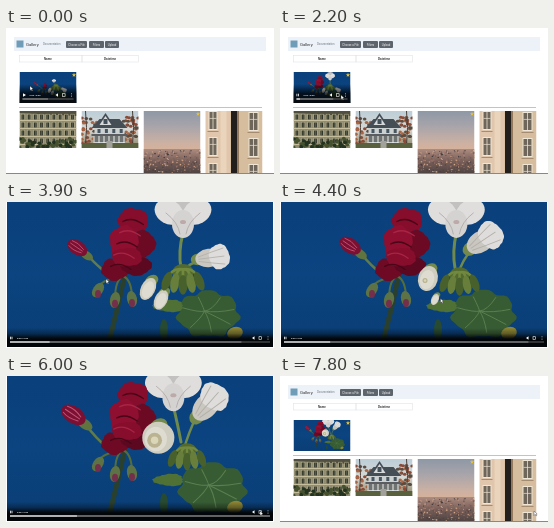
Write an HTML page with a canvas that moves like this. It is 268 px wide and 146 px high and loops after 7.9 s.

```html
<!DOCTYPE html>
<html lang="en">
<head>
<meta charset="utf-8">
<title>Gallery</title>
<style>
html, body { margin: 0; width: 100%; height: 100%; overflow: hidden; background: #fff; }
canvas { display: block; width: 268px; height: 146px; }
</style>
</head>
<body>
<canvas id="stage"></canvas>
<script>
const W = 268, H = 146, LOOP = 7900, OPEN = 2600, CLOSE = 6600, START = 850;
const canvas = document.getElementById('stage');
const c = canvas.getContext('2d');
const dpr = window.devicePixelRatio || 1;
canvas.width = W * dpr;
canvas.height = H * dpr;

const rect = (x, y, w, h, fill) => { c.fillStyle = fill; c.fillRect(x, y, w, h); };

function oval(x, y, rx, ry, turn, fill) {
  c.fillStyle = fill;
  c.beginPath();
  c.ellipse(x, y, rx, ry, turn, 0, 7);
  c.fill();
}

function poly(points, fill) {
  c.fillStyle = fill;
  c.beginPath();
  points.forEach(p => c.lineTo(...p));
  c.closePath();
  c.fill();
}

// Oval with a wavy edge
function ruffle(x, y, rx, ry, waves, depth, fill) {
  const edge = [];
  for (let a = 0; a < 6.28; a += .1) {
    const r = 1 + depth * (Math.sin(a * waves + x) + .4 * Math.sin(a * 13 + y));
    edge.push([x + rx * r * Math.cos(a), y + ry * r * Math.sin(a)]);
  }
  poly(edge, fill);
}

function curve(x, y, cx, cy, ex, ey, stroke, width) {
  c.strokeStyle = stroke;
  c.lineWidth = width;
  c.beginPath();
  c.moveTo(x, y);
  c.quadraticCurveTo(cx, cy, ex, ey);
  c.stroke();
}

function text(str, x, y, size, fill, weight = '') {
  c.font = `${weight} ${size}px "Liberation Sans", sans-serif`;
  c.fillStyle = fill;
  c.fillText(str, x, y);
}

function fade(y, h, ...colors) {
  const g = c.createLinearGradient(0, y, 0, y + h);
  colors.forEach((col, i) => g.addColorStop(i / (colors.length - 1), col));
  return g;
}

// Draw in local units, clipped to a box
function framed(x, y, w, h, scale, draw) {
  c.save();
  c.beginPath();
  c.rect(x, y, w, h);
  c.clip();
  c.translate(x, y);
  c.scale(scale, scale);
  draw();
  c.restore();
}

function placed([x, y, scale, turn = 0], draw) {
  c.save();
  c.translate(x, y);
  c.scale(scale, scale);
  c.rotate(turn);
  draw();
  c.restore();
}

function random(seed) {
  return () => (seed = (seed * 16807) % 2147483647) / 2147483647;
}

function ease(t, from, to) {
  const k = Math.min(1, Math.max(0, (t - from) / (to - from)));
  return k * k * (3 - 2 * k);
}

const mix = (a, b, k) => a.map((v, i) => v + (b[i] - v) * k);

function redFlower() {
  ruffle(-13, 21, 13, 11, 5, .05, '#6f0a25');
  ruffle(8, 17, 15, 10, 4, .05, '#5c0820');
  ruffle(5, -27, 15, 12, 5, .05, '#860d2c');
  ruffle(14, -4, 13, 13, 4, .05, '#6c0a24');
  ruffle(-4, -6, 14, 16, 5, .05, '#8f0f30');
  ruffle(-1, 9, 15, 9, 4, .05, '#860d2c');
  for (let i = 0; i < 5; i++) {
    const y = -26 + i * 11, x = 4 - i * 3;
    curve(x - 9, y, x, y - 5, x + 11, y + 3, i % 2 ? '#a92546' : '#480617', 1.3);
  }
}

function redBud() {
  oval(12, 1, 7, 4, 0, '#60743f');
  oval(0, 0, 11, 7, 0, '#7c1033');
  for (let i = -1; i < 2; i++) curve(-8, i * 3, -2, i * 5, 6, i * 2, '#bd5577', .8);
}

function whiteFlower() {
  oval(1, -13, 18, 13, 0, '#c3c0c0');
  for (const side of [-1, 1]) oval(side * 14, -3, 15, 12, -side * .5, '#e0dedc');
  oval(0, 9, 11, 14, 0, '#d5d3d1');
  for (const side of [-1, 1]) curve(side * 3, 19, side * 5, 7, side * 17, -2, '#aaa6a5', .8);
  oval(0, 7, 3, 2, 0, '#bca9aa');
}

function rightBud() {
  oval(-13, 0, 6, 5, 0, '#748a4c');
  oval(-3, 0, 12, 8, 0, '#c9c7c0');
  ruffle(6, 0, 9, 11, 4, .04, '#dfdddb');
  for (let i = -1; i < 2; i++) curve(-12, i * 2, 0, i * 5, 10, i * 7, '#b3b0aa', .7);
}

// Hanging bud that opens into a round bloom
function leftBud(open) {
  const turn = .45 * (1 - open);
  oval(4 - 4 * open, -8, 8, 6, -.6, '#748a4c');
  oval(0, 1, 8 + 5 * open, 13, turn, '#cfcdbf');
  oval(-2 * open, 2, 6 + 3 * open, 10, turn, '#dedbd0');
  oval(-3, 3, 6 * open, 6 * open, 0, '#b9b391');
  oval(-3, 3, 3 * open, 3 * open, 0, '#dcd6b8');
}

function calyx() {
  oval(0, -7, 12, 9, 0, '#52692f');
  for (let i = -2; i < 3; i++) {
    const x = i * 9;
    curve(0, -10, x * .8, -13, x, 5, '#71883f', 3);
    oval(x, 7 - Math.abs(i) * 2, 5, 11, -x * .02, i % 2 ? '#687f3c' : '#48602c');
  }
}

function leaf() {
  ruffle(0, 0, 32, 24, 7, .07, '#375c33');
  for (let a = -2.8; a < 3; a += .85)
    curve(-4, -3, 9 * Math.cos(a), 4 * Math.sin(a), 28 * Math.cos(a), 19 * Math.sin(a), '#5c7f50', 1);
}

function scene(t) {
  const early = ease(t, 0, 3400), rise = ease(t, 2800, 5000), open = ease(t, 3900, 5000);
  const late = ease(t, 4000, 7000), whole = ease(t, START, 6800);
  const red = mix([119, 66, .4], [121, 46, 1.02], early);
  const bud = mix([75, 54, .75, .6], [66, 38, 1.25, .6], whole);
  const white = mix([162, 42, .35], [176 - 13 * late, 13 - late, 1], early);
  const right = mix([209, 84, .9, .6], [202, 27, 1.4, -.85], rise);
  const left = mix([141, 86, .9], [155 - 5 * late, 62 - 2 * late, 1.05 + .25 * late], open);

  rect(0, 0, W, H, fade(0, H, '#0a407c', '#0b4480', '#0a3d74'));
  c.lineCap = 'round';
  curve(102, 140, 111, 105, 118, 72, '#2a402f', 5);
  curve(bud[0] + 12, bud[1] + 9, 88, 62, 103, 74, '#617b4a', 2.5);
  curve(white[0], white[1] + 18, 171, 50, 174, 66, '#6f8a4c', 3);
  curve(right[0] - 12, right[1] + 12 * rise, 181, 58, 177, 73, '#6f8a4c', 2.5);
  oval(157, 128, 4, 11, 0, '#274a31');
  placed(mix([196, 112, .85], [206, 112, 1.04], whole), leaf);
  oval(228, 131, 8, 6, -.3, '#8c8535');
  ruffle(162, 104, 15, 6, 3, .1, '#4f7135');
  for (let i = 0; i < 3; i++) {
    const x = 91 + i * 17, y = 88 + 11 * Math.sin(i * 1.1);
    curve(116, 74, x, 78, x, y, '#566d3b', 2);
    oval(x, y, 5, 8, .6 - i * .4, '#5d7345');
    oval(x, y + 4, 3, 4, 0, '#74304a');
  }
  placed([154, 97, .8 * (1 - open)], () => leftBud(0));
  placed(mix([172, 73, 1], [180, 80, .8], rise), calyx);
  placed(right, rightBud);
  placed(white, whiteFlower);
  placed(red, redFlower);
  placed(left, () => leftBud(open));
  placed(bud, redBud);
}

function controls(t, x, y, w, h) {
  const played = Math.max(0, t - START) / 20000, buffered = Math.min(1, .5 + t / 10000);
  const sec = String(Math.floor(played * 20)).padStart(2, '0');
  const mid = y + h - 8, bar = y + h - 4, end = x + w;
  if (t < START) poly([[x + 3.5, mid - 1.7], [x + 6.5, mid], [x + 3.5, mid + 1.7]], '#fff');
  else for (const dx of [3, 4.6]) rect(x + dx, mid - 1.3, .8, 2.6, '#fff');
  text(`0:${sec} / 0:20`, x + 10, mid + .8, 2.3, '#fff', 'bold');
  poly([[end - 21, mid], [end - 18.5, mid - 1.8], [end - 18.5, mid + 1.8]], '#fff');
  c.strokeStyle = '#fff';
  c.lineWidth = .6;
  c.strokeRect(end - 14, mid - 1.3, 2.6, 2.6);
  for (let d = -1.5; d < 2; d += 1.5) oval(end - 5, mid + d, .4, .4, 0, '#fff');
  [[1, '#606060'], [buffered, '#929292'], [played, '#fff']]
    .forEach(([part, fill]) => rect(x + 3, bar - .5, (w - 6) * part, 1, fill));
}

function facade() {
  rect(0, 0, 57, 37, '#8f8c70');
  poly([[0, 0], [57, 0], [57, 5], [0, 2]], '#514f40');
  for (let row = 0; row < 4; row++) {
    rect(0, 9 + row * 8, 57, 1, '#c5bd9b');
    for (let col = 0; col < 9; col++) {
      const x = 2 + col * 6.2, y = 3.5 + row * 8;
      rect(x - .6, y - .6, 4, 5.8, '#b8b18f');
      rect(x, y, 2.8, 5, '#303529');
      rect(x + 1.2, y, .4, 5, '#8e907c');
    }
  }
  const r = random(31);
  for (let i = 0; i < 55; i++) {
    const x = r() * 57;
    oval(x, 37 - r() * (4 + Math.abs(x - 25) * .25), 2, 1.8, 0, i % 2 ? '#243320' : '#46522f');
  }
}

function house() {
  rect(0, 0, 57, 37, fade(0, 37, '#bdced7', '#d5d8d5', '#89805f'));
  const r = random(77);
  for (let i = 0; i < 65; i++) {
    const x = r() < .5 ? r() * 16 : 42 + r() * 15;
    oval(x, 6 + r() * 26, 1.8, 1.5, 0, ['#8b4b36', '#a86443', '#594c40'][i % 3]);
  }
  for (const x of [4, 51]) curve(x, 34, x + 2, 16, x, 0, '#4a3e37', 1);
  rect(13, 15, 30, 17, '#cbd0d0');
  poly([[10, 17], [18, 8], [38, 8], [46, 17]], '#454d55');
  poly([[16, 14], [24, 2], [32, 14]], '#444c55');
  poly([[18, 14], [24, 5], [30, 14]], '#d7dada');
  rect(22, 8, 4, 5, '#43505a');
  for (let x = 16; x < 40; x += 7.4) rect(x, 18, 3, 4, '#485662');
  rect(10, 23, 36, 2, '#5b5d60');
  rect(12, 25, 32, 6, '#6e7371');
  for (let x = 12; x < 46; x += 5) rect(x, 25, 1, 7, '#eef0eb');
  rect(0, 32, 57, 5, '#59613e');
  rect(25, 30, 6, 7, '#a3a29a');
}

function city() {
  rect(0, 0, 57, 63, fade(0, 48, '#8e98a6', '#a9a5aa', '#ccb1a2', '#e4b18d'));
  rect(0, 38, 57, 25, fade(38, 25, '#ad8c80', '#785e58', '#4b4140'));
  const r = random(91);
  for (let i = 0; i < 240; i++) {
    const y = 39 + r() * 24;
    rect(r() * 57, y, .6 + r(), .5 + r(), ['#d3a98b', '#463b3d', '#9f7569', '#715c59'][i % 4]);
  }
}

function tallWindow(x, y, w, h) {
  rect(x - 1, y - 1, w + 2, h + 2, '#f0e6d5');
  rect(x, y, w, h, '#6f665b');
  rect(x + w / 2 - .4, y, .8, h, '#eae0ce');
  rect(x, y + h * .35, w, .7, '#eae0ce');
  rect(x - 2, y + h + 2, w + 4, 1, '#a58b70');
}

function walls() {
  rect(0, 0, 57, 63, '#d5bd9d');
  rect(0, 0, 25, 63, '#e0c6ac');
  rect(15, 0, 6, 63, '#ead4bb');
  rect(25.5, 0, 6, 63, '#211e1b');
  rect(31.5, 0, 2, 63, '#95795c');
  for (let y = 1; y < 60; y += 26) {
    tallWindow(4, y, 7, 17);
    tallWindow(44, y + 1, 8, 17);
  }
}

function star(x, y) {
  const points = [];
  for (let i = 0; i < 10; i++) {
    const a = i * Math.PI / 5 - Math.PI / 2, r = i % 2 ? 1 : 2.2;
    points.push([x + r * Math.cos(a), y + r * Math.sin(a)]);
  }
  poly(points, '#e6c034');
}

function button(x, w, label) {
  c.fillStyle = '#5d646b';
  c.beginPath();
  c.roundRect(x, 13, w, 7, 1);
  c.fill();
  c.textAlign = 'center';
  text(label, x + w / 2, 17.5, 2.7, '#fff');
  c.textAlign = 'left';
}

function gallery(t) {
  rect(0, 0, W, H, '#fff');
  rect(8, 9, 252, 14, '#edf2f9');
  rect(10.5, 12.5, 7, 7, '#6f9db8');
  text('Gallery', 20, 17.8, 4, '#222');
  text('Documentation', 37, 17.4, 2.6, '#68717a');
  button(60, 21, 'Choose a File');
  button(83, 15, 'Filters');
  button(99, 14, 'Upload');
  c.strokeStyle = '#dfe3e6';
  c.lineWidth = .6;
  c.strokeRect(13.5, 27.5, 62.5, 6.5);
  c.strokeRect(76, 27.5, 56.5, 6.5);
  text('Name', 38, 32, 2.9, '#333', 'bold');
  text('Datetime', 98, 32, 2.9, '#333', 'bold');
  framed(13.5, 44, 57, 31, 57 / W, () => scene(t));
  if (t < OPEN) {
    rect(13.5, 56, 57, 19, fade(56, 19, 'rgba(0,0,0,0)', 'rgba(0,0,0,.75)', '#080b0e'));
    controls(t, 13.5, 44, 57, 31);
  }
  star(68, 47);
  rect(13, 79, 243, .7, '#aaa');
  [facade, house, city, walls].forEach((photo, i) =>
    framed(13.5 + i * 62, 83, 57, i < 2 ? 37 : 63, 1, photo));
  star(192, 86);
  rect(0, 145, W, 1, '#888');
}

function player(t) {
  rect(0, 0, W, H, '#fff');
  framed(1, 0, 266, 145, 1, () => scene(t));
  rect(1, 126, 266, 19, fade(126, 11, 'rgba(0,0,0,0)', 'rgba(0,0,0,.3)', '#030608'));
  controls(t, 1, 0, 266, 144);
}

// Time and place of each stop of the pointer
const STOPS = [[0, 24, 58], [700, 18, 67], [1200, 18, 67], [2300, 62, 67], [2900, 55, 66], [3900, 100, 77], [5000, 240, 122], [6000, 254, 135], [LOOP, 254, 135]];

function pointer(t) {
  const i = STOPS.findIndex(stop => t < stop[0]);
  const [a, b] = [STOPS[i - 1], STOPS[i]];
  const [, x, y] = mix(a, b, ease(t, a[0], b[0]));
  placed([x, y, 1], () => {
    poly([[0, 0], [0, 4.5], [1.1, 3.4], [2, 5], [2.7, 4.6], [1.9, 3.1], [3.2, 3]], '#fff');
    c.strokeStyle = '#222';
    c.lineWidth = .35;
    c.stroke();
  });
}

const begin = performance.now();
function draw() {
  const t = Math.floor((performance.now() - begin) % LOOP / 100) * 100;
  c.setTransform(dpr, 0, 0, dpr, 0, 0);
  if (t >= OPEN && t < CLOSE) player(t);
  else gallery(t);
  pointer(t);
  requestAnimationFrame(draw);
}
draw();
</script>
</body>
</html>
```
